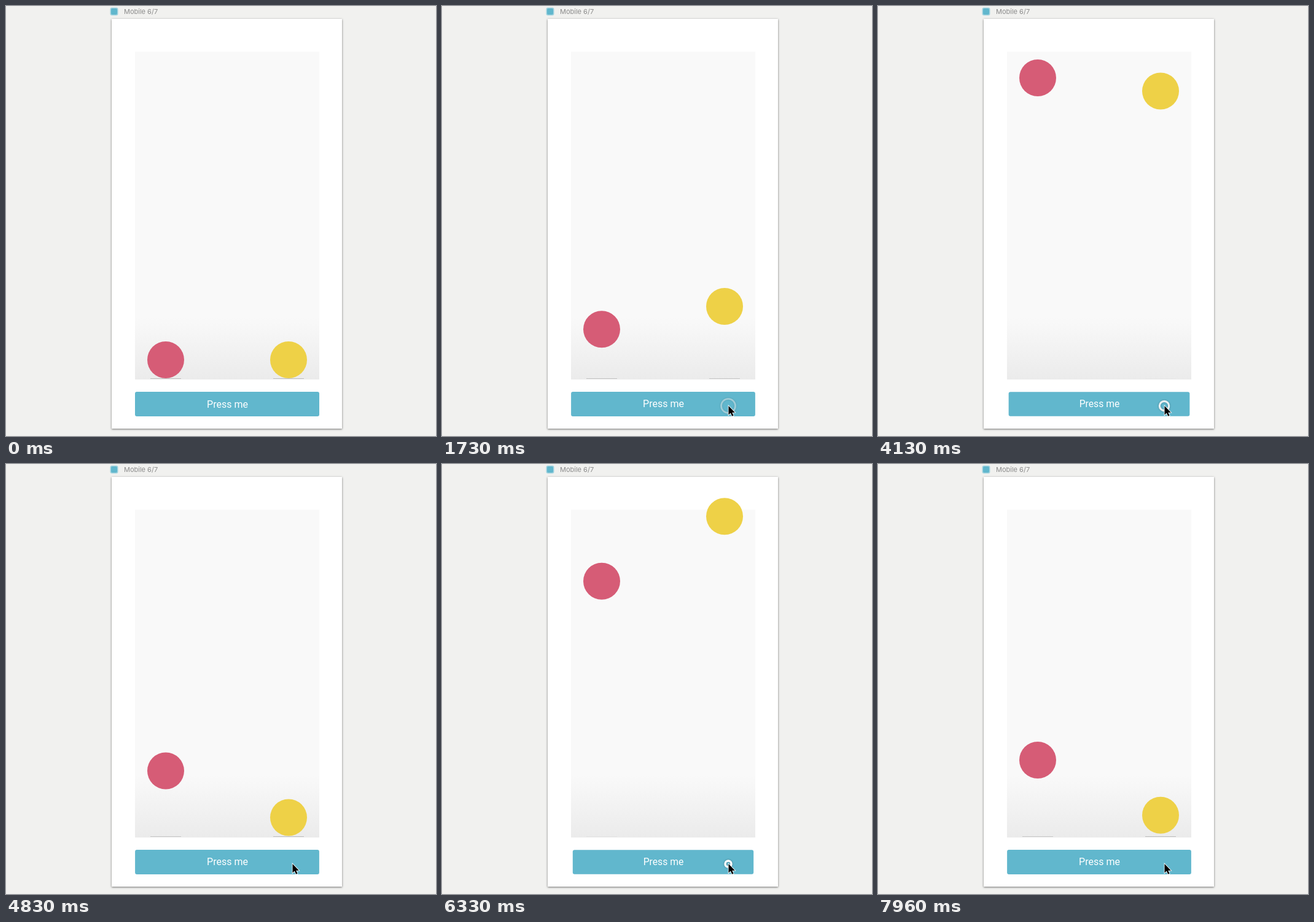
Recreate the animation shown at these times as an HTML page with a canvas. Size 700x700 px, loop 7990 ms.

```html
<!DOCTYPE html>
<html lang="en">
<head>
<meta charset="utf-8">
<title>Press and hold</title>
<style>
  html, body { margin: 0; width: 100%; height: 100%; overflow: hidden; background: #f1f1ef; }
  canvas { display: block; width: 700px; height: 700px; }
</style>
</head>
<body>
<canvas id="stage" width="700" height="700"></canvas>
<script>
const ctx = document.getElementById('stage').getContext('2d');
const LOOP = 7.99, FLOOR = 576, TRAVEL = 464;
const TEAL = '#61b7cd';
const TAP = { down: 1.23, up: 1.33 };
const HOLDS = [{ down: 2.02, up: 4.042 }, { down: 5.648, up: 7.19 }];
const PRESSES = [TAP, ...HOLDS];
const TOUCH = { x: 466, y: 651 };

// Step responses, 0 at rest to 1 at the goal.
const critical = (t, w) => 1 - (1 + w * t) * Math.exp(-w * t);
function spring(t, w, zeta) {
  const root = Math.sqrt(1 - zeta * zeta), a = w * root * t;
  return 1 - Math.exp(-zeta * w * t) * (Math.cos(a) + zeta / root * Math.sin(a));
}

const pink = {
  x: 260, color: '#d65c76', hop: { from: 1.26, to: 1.9, height: 64 },
  rise: t => TRAVEL * critical(t, 4.7),
  fall: t => Math.max(0, TRAVEL - 0.5 * 1245 * t * t)
};
const yellow = {
  x: 460, color: '#eed147', hop: { from: 1.25, to: 1.91, height: 110 },
  rise: t => TRAVEL * spring(t, 4.85, 0.62),
  fall: t => TRAVEL * Math.abs(1 - spring(t, 4.15, 0.7))
};

const latest = (list, t) => list.filter(p => t >= p.down).pop();

function heightOf(ball, t) {
  const hold = latest(HOLDS, t);
  if (hold) return t < hold.up ? ball.rise(t - hold.down) : ball.fall(t - hold.up);
  const { from, to, height } = ball.hop, s = (t - from) / (to - from);
  return s > 0 && s < 1 ? 4 * height * s * (1 - s) : 0;
}

function pressAmount(t) {
  const p = latest(PRESSES, t);
  if (!p) return 0;
  const reached = critical(Math.min(t, p.up) - p.down, 6.5);
  return t < p.up ? reached : reached * (1 - critical(t - p.up, 6.5));
}

function box(x, y, w, h, r, fill) {
  ctx.beginPath();
  ctx.roundRect(x, y, w, h, r);
  ctx.fillStyle = fill;
  ctx.fill();
}

function drawScene() {
  box(0, 0, 700, 700, 0, '#f1f1ef');
  box(169.5, 2.5, 13, 13, 3, '#a3d3df');
  box(171, 4, 10, 10, 2, TEAL);
  ctx.font = '11px Inter, sans-serif';
  ctx.textAlign = 'left';
  ctx.fillStyle = '#8b8b8b';
  ctx.fillText('Mobile 6/7', 192, 13);

  ctx.save();
  ctx.shadowColor = 'rgba(0,0,0,.55)';
  ctx.shadowBlur = 3;
  ctx.shadowOffsetY = 1;
  box(172, 21, 375, 667, 0, '#fff');
  ctx.restore();

  const shade = ctx.createLinearGradient(0, 508, 0, 608);
  shade.addColorStop(0, '#f9f9f9');
  shade.addColorStop(1, '#ebebeb');
  box(210, 74.5, 300, 533.5, 0, shade);
}

function drawBall(ball, t) {
  const h = heightOf(ball, t);
  ctx.globalAlpha = Math.max(0, Math.min(1, 1 - h / TRAVEL));
  box(ball.x - 25, 606, 50, 1, 0, '#bfbfbf');
  ctx.globalAlpha = 1;
  ctx.beginPath();
  ctx.arc(ball.x, FLOOR - h, 30, 0, Math.PI * 2);
  ctx.fillStyle = ball.color;
  ctx.fill();
}

function drawButton(t) {
  const scale = 1 - 0.02 * pressAmount(t);
  ctx.save();
  ctx.translate(360, 648);
  ctx.scale(scale, scale);
  box(-150, -20, 300, 40, 3, TEAL);
  ctx.font = '16px Roboto, sans-serif';
  ctx.textAlign = 'center';
  ctx.fillStyle = '#fff';
  ctx.fillText('Press me', 0.5, 5.5);
  ctx.restore();
}

function drawRing(t) {
  const p = latest(PRESSES, t);
  if (!p) return;
  const since = Math.max(0, t - p.up), alpha = 1 - since / 0.72;
  if (alpha <= 0) return;
  const grow = 1 - Math.exp(-since / 0.2);
  ctx.save();
  ctx.globalAlpha = alpha;
  ctx.shadowColor = 'rgba(0,0,0,.35)';
  ctx.shadowBlur = 3;
  ctx.beginPath();
  ctx.arc(TOUCH.x, TOUCH.y, 5 + 7.5 * grow, 0, Math.PI * 2);
  ctx.lineWidth = 3.5 - grow;
  ctx.strokeStyle = '#fff';
  ctx.stroke();
  ctx.restore();
}

function cursorAt(t) {
  const stops = [[0.1, 526, 690], [0.26, 498, 661], [0.45, 498, 661], [0.56, 466, 651]];
  const next = stops.findIndex(s => t < s[0]);
  if (next === 0) return null;
  if (next < 0) return [466, 651];
  const [t0, x0, y0] = stops[next - 1], [t1, x1, y1] = stops[next];
  const s = (t - t0) / (t1 - t0), k = s * (2 - s);
  return [x0 + (x1 - x0) * k, y0 + (y1 - y0) * k];
}

const arrow = new Path2D('M0 0V14.6L3.3 11.6L5.7 16.8L8.1 15.7L5.8 10.7H10.3Z');
function drawCursor(t) {
  const at = cursorAt(t);
  if (!at) return;
  ctx.save();
  ctx.translate(at[0] + 0.5, at[1]);
  ctx.lineWidth = 1.6;
  ctx.strokeStyle = '#fff';
  ctx.stroke(arrow);
  ctx.fillStyle = '#000';
  ctx.fill(arrow);
  ctx.restore();
}

function render() {
  const t = performance.now() / 1000 % LOOP;
  drawScene();
  drawBall(pink, t);
  drawBall(yellow, t);
  drawButton(t);
  drawRing(t);
  drawCursor(t);
  requestAnimationFrame(render);
}
render();
</script>
</body>
</html>
```
